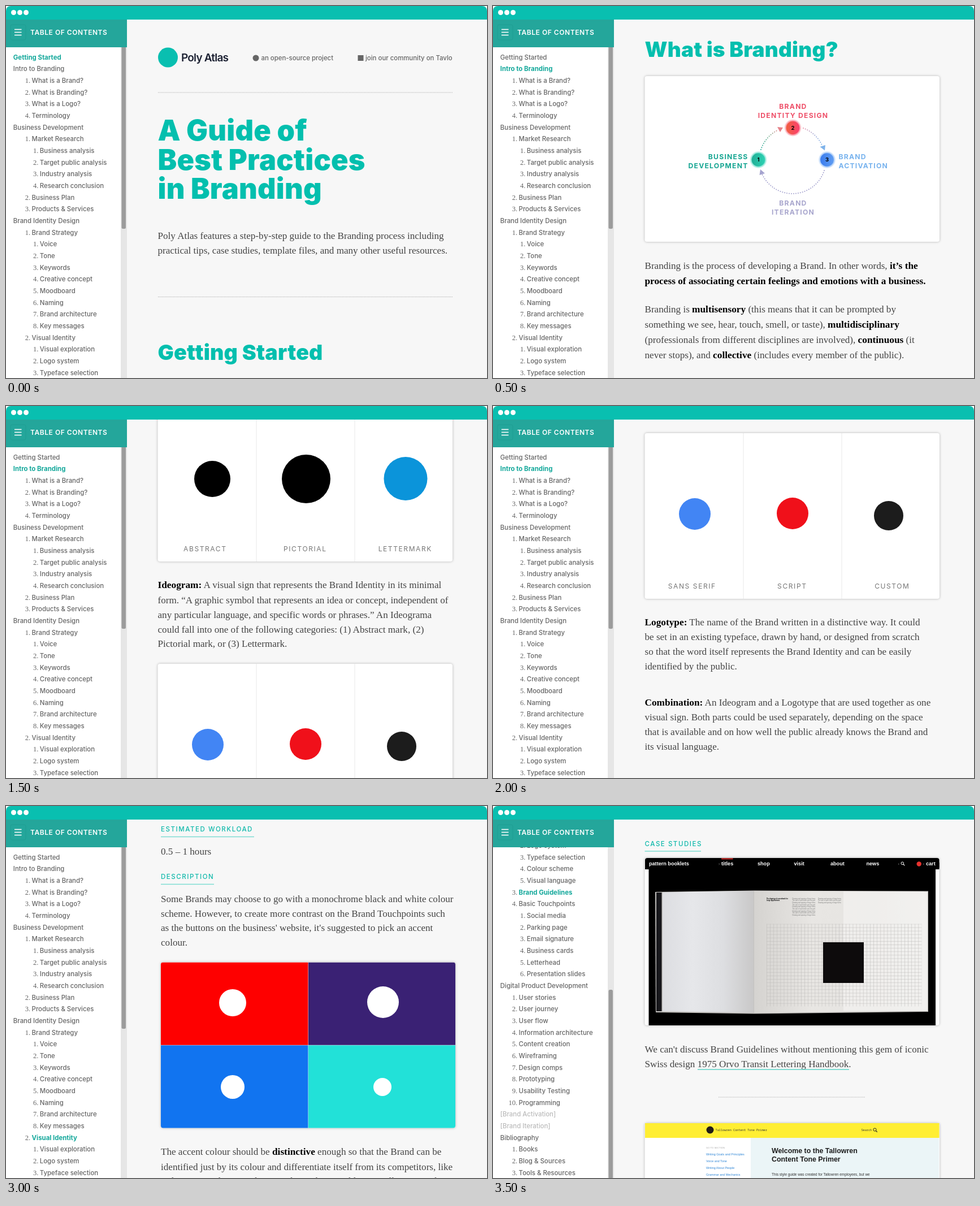
These frames come from a looping animation (851 px wide and 658 px high, 4000 ms). An HTML page:

```html
<!DOCTYPE html>
<html lang="en">
<head>
<meta charset="utf-8">
<title>Branding guide</title>
<style>
html, body { margin: 0; width: 100%; height: 100%; overflow: hidden; background: #fff; }
svg { display: block; width: 851px; height: 658px; font-family: Inter, sans-serif; }
.body { font: 17.1px "Liberation Serif", "Times New Roman", serif; fill: #444; }
.body .b { font-size: 17.3px; font-weight: 700; fill: #000; }
.item { font-size: 11.4px; font-weight: 500; fill: #666; }
.item.off { fill: #bbb; }
.item.on { font-weight: 700; fill: #14a89b; }
.num { font: 12.5px "Liberation Serif", serif; fill: #666; text-anchor: end; }
.head { font-weight: 900; letter-spacing: .005em; fill: #03bfae; }
.cap { font-size: 12.2px; font-weight: 700; letter-spacing: 1.2px; }
.tag { font-size: 12px; letter-spacing: 1.6px; fill: #777; text-anchor: middle; }
.sub { font-size: 11.5px; font-weight: 500; letter-spacing: 1.55px; fill: #0fb9ab; }
.arial { font-family: "Liberation Sans", Arial, sans-serif; }
.mono { font-family: "Noto Sans Mono", monospace; }
.card { filter: drop-shadow(0 0 2px rgba(0,0,0,.28)); }
.mid { text-anchor: middle; }
.end { text-anchor: end; }
</style>
</head>
<body>
<svg id="stage" viewBox="0 0 851 658" xmlns="http://www.w3.org/2000/svg"></svg>
<script>
const TEAL = '#09bfb0';

const text = (x, y, s, cls = '', more = '') =>
  `<text x="${x}" y="${y}" class="${cls}" ${more}>${s}</text>`;
const rect = (x, y, w, h, fill, more = '') =>
  `<rect x="${x}" y="${y}" width="${w}" height="${h}" fill="${fill}" ${more}/>`;
const circle = (x, y, r, fill, more = '') =>
  `<circle cx="${x}" cy="${y}" r="${r}" fill="${fill}" ${more}/>`;
const path = (d, more) => `<path d="${d}" ${more}/>`;
const size = n => `font-size="${n}"`;
const card = (y, h = 293) => rect(268.5, y, 521.5, h, '#fff', 'rx="4" class="card"');
const rule = (y, x1 = 269, x2 = 790) =>
  path(`M${x1} ${y}H${x2}`, 'stroke="#adadad" stroke-width="1.2" stroke-dasharray="1.3 1.3"');
const shift = (dy, s) => `<g transform="translate(0 ${dy})">${s}</g>`;

// Lines of body text; *stars* mark bold.
function prose(x, ys, lines) {
  return lines.map((s, i) => text(x, ys[i],
    s.replace(/\*(.+?)\*/g, '<tspan class="b">$1</tspan>'), 'body')).join('');
}

function subhead(x, y, s, w) {
  return text(x, y, s, 'sub') + rect(x, y + 8.7, w, 1.5, '#7edcd2');
}

function welcome() {
  return circle(286.5, 91, 17.5, TEAL) +
    text(310, 98, 'Poly Atlas', '', 'font-size="19" font-weight="600" letter-spacing="-.8" fill="#1d2233"') +
    circle(442, 92, 5.5, '#666') + text(451.5, 96, 'an open-source project', 'item') +
    rect(622.5, 87, 10, 10, '#666') + text(636, 96, 'join our community on Tavlo', 'item') +
    rule(153) +
    ['A Guide of', 'Best Practices', 'in Branding'].map((s, i) =>
      text(268.5, 238 + 51.7 * i, s, 'head', size(50.4))).join('') +
    prose(268.5, [412, 438], [
      'Poly Atlas features a step-by-step guide to the Branding process including',
      'practical tips, case studies, template files, and many other useful resources.']) +
    rule(514.5) +
    text(268.5, 626, 'Getting Started', 'head', size(37.6));
}

function node(x, y, n, fill, glow) {
  return circle(x, y, 15, glow, 'opacity=".22"') + circle(x, y, 13.4, glow, 'opacity=".4"') +
    circle(x, y, 11.8, fill) + text(x, y + 3.3, n, 'mid', 'font-size="9.5" font-weight="700"');
}

function cycle() {
  const arc = (d, c) => path(d, `fill="none" stroke="${c}" stroke-width="1.9" stroke-linecap="round" stroke-dasharray=".1 3.9"`);
  const tip = (d, c) => path(d + 'z', `fill="${c}"`);
  const pair = (x, y, a, b, c, cls) =>
    [a, b].map((s, i) => text(x, y + 16 * i, s, 'cap ' + cls, `fill="${c}"`)).join('');
  return card(124) +
    arc('M474 254A59 59 0 0 1 505 219', 'url(#warm)') +
    arc('M549 216A59 59 0 0 1 582 246', 'url(#cool)') +
    arc('M586 291A59 59 0 0 1 476 297', '#a5a3cf') +
    tip('M503 214L513 215L508 223', '#e58289') +
    tip('M578.5 249L588 246L587 255.5', '#7fb3ea') +
    tip('M473 289L481 296L471.5 299', '#a5a3cf') +
    node(530.5, 215.5, 2, 'url(#n2)', '#f8506a') +
    node(469.5, 272, 1, 'url(#n1)', '#35d0b6') +
    node(591, 272, 3, 'url(#n3)', '#6aa4f2') +
    pair(531, 182.3, 'BRAND', 'IDENTITY DESIGN', '#ee5069', 'mid') +
    pair(451.5, 270.5, 'BUSINESS', 'DEVELOPMENT', '#16a592', 'end') +
    pair(611.5, 270.5, 'BRAND', 'ACTIVATION', '#78b3ee', '') +
    pair(531, 352.5, 'BRAND', 'ITERATION', '#a8a6cd', 'mid');
}

function branding() {
  return text(268.5, 90, 'What is Branding?', 'head', size(37)) + cycle() +
    prose(268.5, [465, 492, 542, 569, 596, 623], [
      'Branding is the process of developing a Brand. In other words, *it’s the*',
      '*process of associating certain feelings and emotions with a business.*',
      'Branding is *multisensory* (this means that it can be prompted by',
      'something we see, hear, touch, smell, or taste), *multidisciplinary*',
      '(professionals from different disciplines are involved), *continuous* (it',
      'never stops), and *collective* (includes every member of the public).']);
}

// Three-column card whose marks are plain circles.
function trio(y, marks, labels) {
  return card(y) +
    [442.5, 616.5].map(x => rect(x, y, 1, 293, '#e9e9e9')).join('') +
    marks.map(([x, dy, r, c]) => circle(x, y + dy, r, c)).join('') +
    labels.map((s, i) => text(352.3 + 177 * i, y + 274.5, s, 'tag')).join('');
}
const ideograms = y => trio(y,
  [[365, 147, 32, '#000'], [531, 147, 43, '#000'], [707, 146.5, 38.5, '#0b94da']],
  ['ABSTRACT', 'PICTORIAL', 'LETTERMARK']);
const logotypes = y => trio(y,
  [[357, 143, 28, '#4285f4'], [530, 142, 28, '#f0101a'], [700, 146, 26, '#1c1c1c']],
  ['SANS SERIF', 'SCRIPT', 'CUSTOM']);

function logoIntro() {
  return shift(-400, branding()) + rule(272) +
    text(268.5, 364, 'What is a Logo?', 'head', size(37)) +
    prose(268.5, [424, 450], [
      'A Logo is a visual sign that represents the *Brand Identity*. It could be',
      'an Ideogram, a Logotype, or a combination of both.']) +
    ideograms(496);
}

function ideogram() {
  return ideograms(-18) +
    prose(268.5, [322, 348.5, 374.5, 400.5, 426], [
      '*Ideogram:* A visual sign that represents the Brand Identity in its minimal',
      'form. “A graphic symbol that represents an idea or concept, independent of',
      'any particular language, and specific words or phrases.” An Ideograma',
      'could fall into one of the following categories: (1) Abstract mark, (2)',
      'Pictorial mark, or (3) Lettermark.']) +
    logotypes(456);
}

function logotype() {
  return logotypes(48) +
    prose(268.5, [388, 414, 440, 466, 530, 556, 582, 608], [
      '*Logotype:* The name of the Brand written in a distinctive way. It could',
      'be set in an existing typeface, drawn by hand, or designed from scratch',
      'so that the word itself represents the Brand Identity and can be easily',
      'identified by the public.',
      '*Combination:* An Ideogram and a Logotype that are used together as one',
      'visual sign. Both parts could be used separately, depending on the space',
      'that is available and on how well the public already knows the Brand and',
      'its visual language.']);
}

function price(x, w, tipX, s) {
  return rect(x, 163, w, 31, '#dadada', 'rx="2"') +
    path(`M${tipX - 4} 193h8l-4 4z`, 'fill="#dadada"') +
    text(x + w / 2, 185.3, s, 'mid', 'font-size="20" font-weight="600" fill="#a6a6a6"');
}

function value() {
  const label = (y, a, b, c) =>
    text(329.5, y, a, '', 'font-size="12.5" font-weight="600" fill="#fff"') +
    text(329.5, y + 15.8, b, '', `font-size="12.5" font-weight="500" fill="${c}"`);
  return prose(268.5, [61.5, 88.5, 115.5], [
      'The goal of a Brand Identity Design project is to *translate the Business*',
      '*Strategy into a distinctive trademark* which reflects the business goals',
      'and aspirations while appealing to the target public.']) +
    card(145, 292.5) +
    [311.5, 489.2, 748.5].map(x =>
      path(`M${x} 196V437`, 'stroke="#d8d8dc" stroke-width="1.8" stroke-dasharray="2 2"')).join('') +
    price(310, 48, 314, '$') + price(465, 49.5, 489.2, '$$') + price(701, 48.5, 745.5, '$$$') +
    rect(310, 223, 439, 69.5, 'url(#violet)') + rect(310, 223, 439, 69.5, 'url(#ember)') +
    rect(582, 296, 167, 71, '#fff') + rect(582, 296, 167, 71, 'url(#hatch)') +
    rect(310, 296, 272, 71, '#f85a73') + rect(310, 223, 7, 144, '#2d2a3e') +
    label(254.5, 'Quality value', 'of your business', '#dfbbe9') +
    label(328, 'Perceived value', 'by your target public', '#fdc4cd') +
    prose(268.5, [484.5, 510.5, 536.5, 563], [
      'The Business Development process aims to increase the value of the',
      "business' products and services, while the aim of the Brand Identity Design",
      'is to *reflect the Quality Value and increase the Perceived Value* in order',
      'to attract potential customers.']);
}

function colours() {
  return subhead(274, 45, 'ESTIMATED WORKLOAD', 165) + subhead(274, 129, 'DESCRIPTION', 94) +
    prose(274, [85.5, 169.5, 195.5, 221.3, 247, 616.5, 643.5, 668.5], [
      '0.5 – 1 hours',
      'Some Brands may choose to go with a monochrome black and white colour',
      'scheme. However, to create more contrast on the Brand Touchpoints such',
      "as the buttons on the business' website, it's suggested to pick an accent",
      'colour.',
      'The accent colour should be *distinctive* enough so that the Brand can be',
      'identified just by its colour and differentiate itself from its competitors, like',
      "Vola-Mint's red, Harrowby's purple, Linkmoor's blue or Belloway's teal"]) +
    rect(274, 276.5, 521, 293, '#fff', 'rx="4" class="card"') +
    '<g clip-path="url(#quad)">' +
    rect(274, 276.5, 260.5, 146.3, '#fe0000') + rect(535, 276.5, 260, 146.3, '#3a2174') +
    rect(274, 423.3, 260.5, 147, '#1174f0') + rect(535, 423.3, 260, 147, '#22e1d8') + '</g>' +
    circle(401, 348, 24, '#fff') + circle(667, 347, 28, '#fff') +
    circle(401, 497, 21, '#fff') + circle(666, 497, 16, '#fff');
}

function lens(x, y, r, c) {
  return circle(x, y, r, 'none', `stroke="${c}" stroke-width="1"`) +
    path(`M${x + r * .7} ${y + r * .7}l2.4 2.4`, `stroke="${c}" stroke-width="1.2"`);
}

function book() {
  const menu = [[404, 'titles'], [468, 'shop'], [532.5, 'visit'], [597, 'about'], [660.5, 'news'], [766, 'cart']];
  const nav = (x, s) => text(x, 104.8, s, 'arial', 'font-size="9.1" font-weight="700" fill="#fff"');
  const tiny = (x, n) => Array.from({ length: n }, (_, i) =>
    text(x, 164.5 + 3.7 * i, i % 2 ? 'The size of each letter sets the grid' : 'Drawing and spacing of large forms',
      'arial', 'font-size="2.6" fill="#777"')).join('');
  return rect(268.5, 92, 521, 296, '#fff', 'rx="4" class="card"') +
    rect(269, 92, 520.5, 20, '#000', 'rx="4"') + rect(269, 100, 520.5, 12, '#000') +
    rect(275.5, 110, 507.5, 278, '#000') + rect(404, 92.5, 20.5, 1.8, '#e8322e') +
    nav(276, 'pattern booklets') + menu.map(m => nav(...m)).join('') +
    [399.5, 717, 761].map(x => path(`M${x} 101.5l1.3 1.2l-1.3 1.2`, 'fill="none" stroke="#999" stroke-width=".7"')).join('') +
    lens(724.3, 101.3, 2.3, '#fff') + circle(753.7, 102.5, 4.2, '#e8322e') +
    path('M287 152L462 149.5L770 150.5V364L462 367.5L288 365z', 'fill="#c4c2bf"') +
    rect(289, 153, 9.5, 210, '#17171b') +
    path('M300 152.5L461 150V365.5L300 363z', 'fill="url(#leaf)"') +
    path('M462 150L768.5 151.5V362.5L462 366z', 'fill="url(#sheet)"') +
    rect(620, 151, 149, 211.5, '#fff', 'opacity=".35"') +
    rect(484, 208.5, 274.5, 146, 'url(#grid)') +
    text(484, 164.5, 'The drawing of a wordmark for', 'arial', 'font-size="2.6" font-weight="700"') +
    text(484, 168.2, 'Large Applications', 'arial', 'font-size="2.6" font-weight="700"') +
    tiny(529.5, 9) + tiny(575, 3) +
    rect(584, 241, 72, 72, '#0d0b0c');
}

function studies() {
  const links = ['Writing Goals and Principles', 'Voice and Tone', 'Writing About People', 'Grammar and Mechanics'];
  return subhead(268.5, 70.5, 'CASE STUDIES', 99.5) + book() +
    prose(268.5, [435.5, 461.5], [
      "We can't discuss Brand Guidelines without mentioning this gem of iconic",
      'Swiss design 1975 Orvo Transit Lettering Handbook.']) +
    rect(362, 465.3, 268, 1.5, '#5fd3c8') + rule(515, 399, 659) +
    card(561, 110) + rect(269, 561, 520.5, 26, '#ffee33') +
    rect(456, 587, 333, 75, '#ebf5f7') +
    circle(384, 573, 6.5, '#221c16') +
    text(393.5, 575, 'Tallowren Content Tone Primer', 'mono', 'font-size="5.25" fill="#333"') +
    text(651.5, 575, 'Search', 'mono', 'font-size="5.2" fill="#333"') + lens(675.5, 572.5, 2.6, '#222') +
    text(377, 605.5, 'GO TO SECTION', 'arial', 'font-size="4.2" fill="#aaa"') +
    links.map((s, i) => text(377, 617.5 + 12.2 * i, s, 'arial', 'font-size="5.4" fill="#2f86d6"')).join('') +
    ['Welcome to the Tallowren', 'Content Tone Primer'].map((s, i) =>
      text(493, 614 + 15.2 * i, s, 'arial', 'font-size="12.4" font-weight="700" fill="#1c1c1c"')).join('') +
    text(493, 654, 'This style guide was created for Tallowren employees, but we', 'arial', 'font-size="6.4" fill="#333"');
}

// Contents: leading dashes give the depth.
const toc = `Getting Started|Intro to Branding|-What is a Brand?|-What is Branding?|-What is a Logo?|-Terminology
|Business Development|-Market Research|--Business analysis|--Target public analysis|--Industry analysis
|--Research conclusion|-Business Plan|-Products &amp; Services|Brand Identity Design|-Brand Strategy|--Voice|--Tone
|--Keywords|--Creative concept|--Moodboard|--Naming|--Brand architecture|--Key messages|-Visual Identity
|--Visual exploration|--Logo system|--Typeface selection|--Colour scheme|--Visual language|-Brand Guidelines
|-Basic Touchpoints|--Social media|--Parking page|--Email signature|--Business cards|--Letterhead
|--Presentation slides|Digital Product Development|-User stories|-User journey|-User flow
|-Information architecture|-Content creation|-Wireframing|-Design comps|-Prototyping|-Usability Testing
|-Programming|[Brand Activation]|[Brand Iteration]|Bibliography|-Books|-Blog &amp; Sources
|-Tools &amp; Resources`.replace(/\n/g, '').split('|');
const ROW = 20.67;

function contents() {
  const count = [0, 0, 0];
  return toc.map((s, i) => {
    const depth = s.match(/^-*/)[0].length, y = 94.7 + ROW * i;
    count[depth]++;
    count.fill(0, depth + 1);
    const x = [12.8, 45.6, 59.8][depth];
    return (depth ? text(x - 2.4, y, count[depth] + '.', 'num') : '') +
      text(x, y, s.slice(depth), 'item' + (s[0] === '[' ? ' off' : ''));
  }).join('');
}

// One entry per half second: page, active row, first row shown.
const views = [
  [welcome, 0, 0], [branding, 1, 0], [logoIntro, 1, 0], [ideogram, 1, 0],
  [logotype, 1, 0], [value, 14, 0], [colours, 24, 0], [studies, 30, 27]
];

const stops = (...cs) => cs.map((c, i) =>
  `<stop offset="${i / (cs.length - 1)}" stop-color="${c}"/>`).join('');
const linear = (id, ...cs) => `<linearGradient id="${id}">${stops(...cs)}</linearGradient>`;

const stage = document.getElementById('stage');
stage.innerHTML = `<defs>
  ${linear('warm', '#22a996', '#7fb08f', '#e58289')}${linear('cool', '#e98aa0', '#a9a5cf', '#7fb3ea')}
  ${linear('n1', '#1fae95', '#2ed2b3')}${linear('n2', '#f0603f', '#fb3f6f')}${linear('n3', '#3b7cee', '#5f9df2')}
  ${linear('violet', '#8c2391', '#7a1f97', '#6a0ea6', '#590cb2', '#540bb4')}
  ${linear('leaf', '#dcdde1', '#e6e7ea', '#dddee1', '#c9c8c8')}
  ${linear('sheet', '#d5d3d0', '#e8e6e3', '#e6e4e1', '#eae9e6')}
  <radialGradient id="ember" gradientUnits="userSpaceOnUse" cx="312" cy="222" r="135">
    <stop offset="0" stop-color="#e0577a"/><stop offset=".35" stop-color="#b8397f" stop-opacity=".8"/>
    <stop offset="1" stop-color="#8c2391" stop-opacity="0"/></radialGradient>
  <pattern id="hatch" width="17" height="17" patternUnits="userSpaceOnUse" patternTransform="translate(582 307) rotate(45)">
    <rect width="9.5" height="17" fill="#dddde6"/></pattern>
  <pattern id="grid" x="484" y="208.5" width="6.1" height="6.1" patternUnits="userSpaceOnUse">
    <path d="M0 0H6.1M0 0V6.1" stroke="#bab8b5" stroke-width=".9"/></pattern>
  <clipPath id="window"><path d="M0 658V9Q0 0 9 0H842Q851 0 851 9V658z"/></clipPath>
  <clipPath id="quad"><rect x="274" y="276.5" width="521" height="293" rx="4"/></clipPath>
</defs>
<g clip-path="url(#window)">
  ${rect(0, 0, 851, 658, '#f7f7f7')}
  ${views.map(v => `<g class="page">${v[0]()}</g>`).join('')}
  ${rect(0, 73, 203, 585, '#fff')}<g id="list">${contents()}</g>
  ${rect(203, 73, 11, 585, '#e6e6e6')}${rect(204.5, 60, 7.5, 334, '#9c9c9c', 'id="thumb" rx="2.5"')}
  ${rect(0, 24, 214, 49, '#24a69b')}
  ${rect(8, 33, 27, 27, 'none', 'rx="3" stroke="#1f9d92"')}
  ${[41.5, 46.5, 51.5].map(y => rect(15, y - .8, 12.5, 1.6, '#fff')).join('')}
  ${text(43, 50.6, 'TABLE OF CONTENTS', '', 'font-size="12" font-weight="600" letter-spacing=".55" fill="#fff"')}
  ${rect(0, 0, 851, 24, TEAL)}
  ${[13.5, 24.5, 35.5].map(x => circle(x, 11.5, 4.5, '#fff')).join('')}
</g>`;

const pages = [...stage.querySelectorAll('.page')];
const list = document.getElementById('list');
const rows = [...list.querySelectorAll('.item')];
const thumb = document.getElementById('thumb');
let shown = -1;

function draw(t) {
  const k = Math.floor(t % 4000 / 500);
  if (k === shown) return;
  shown = k;
  const [, active, first] = views[k];
  pages.forEach((p, i) => p.setAttribute('display', i === k ? 'inline' : 'none'));
  rows.forEach((r, i) => r.classList.toggle('on', i === active));
  list.setAttribute('transform', `translate(0 ${-ROW * first})`);
  thumb.setAttribute('y', first ? 325 : 60);
}

const start = performance.now();
function tick() {
  draw(performance.now() - start);
  requestAnimationFrame(tick);
}
tick();
</script>
</body>
</html>
```
